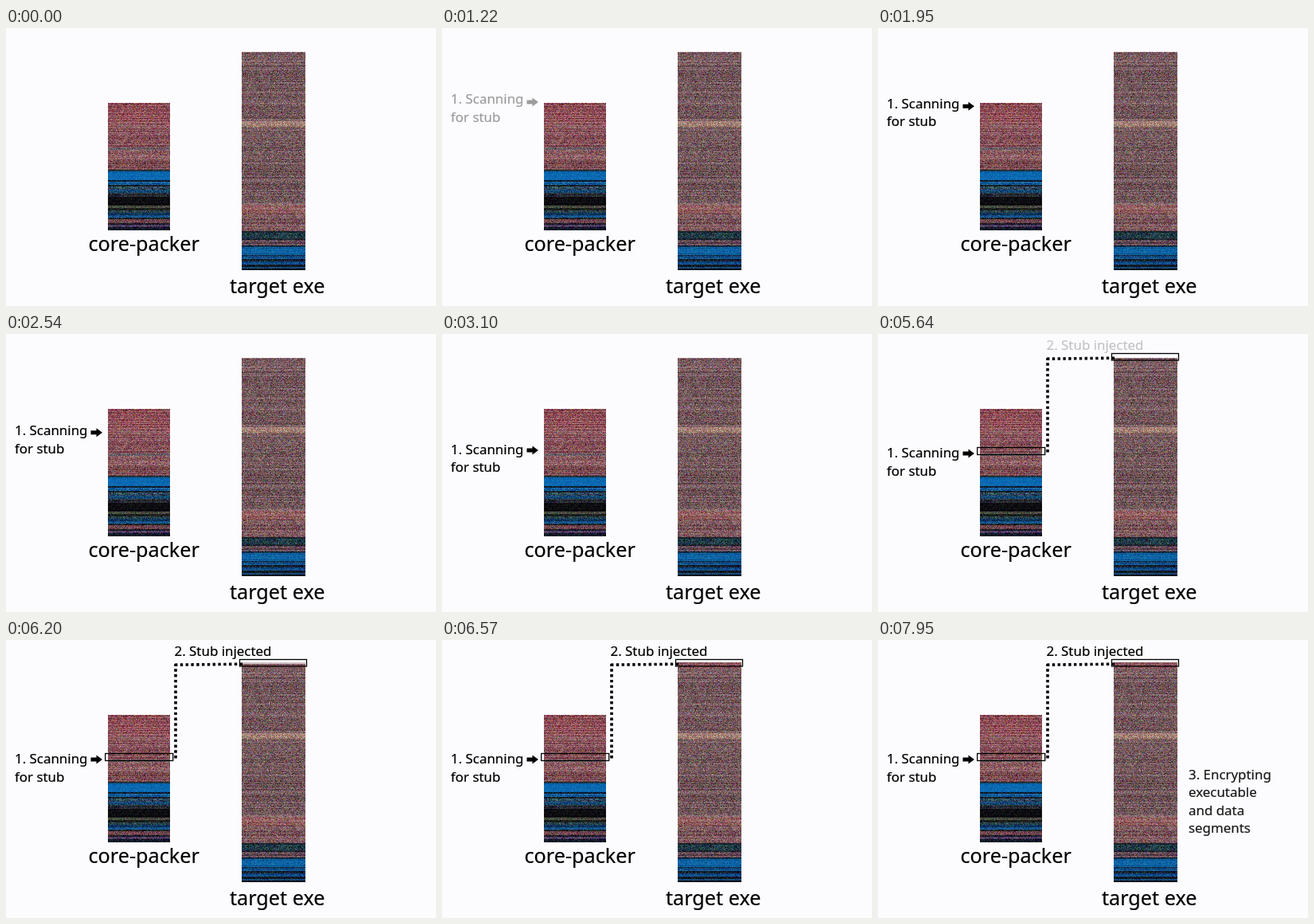
These frames come from a looping animation (540x349 px, 7.99 s). An HTML page with a canvas:

```html
<!DOCTYPE html>
<html lang="en">
<head>
<meta charset="utf-8">
<title>Packing an executable</title>
<style>
  html, body { margin: 0; width: 100%; height: 100%; overflow: hidden; background: #fcfcfe; }
  canvas, svg { position: absolute; left: 0; top: 0; width: 540px; height: 349px; }
  text { font: 16.9px "Noto Sans", "Open Sans", sans-serif; stroke: #000; stroke-width: 0.2; }
  .label { font-size: 25.2px; }
  .box { fill: none; stroke: #000; stroke-width: 1.3; }
  .dots { fill: none; stroke-width: 3.6; stroke-dasharray: 3.4; }
</style>
</head>
<body>
<canvas id="bytes" width="540" height="349"></canvas>
<canvas id="stub" width="540" height="349"></canvas>
<svg viewBox="0 0 540 349">
  <defs>
    <linearGradient id="up" gradientUnits="userSpaceOnUse" x1="0" x2="0">
      <stop offset="0"/><stop offset="1" stop-opacity="0"/>
    </linearGradient>
    <linearGradient id="across" gradientUnits="userSpaceOnUse" y1="0" y2="0">
      <stop offset="0"/><stop offset="1" stop-opacity="0"/>
    </linearGradient>
  </defs>
  <text class="label" x="103.5" y="280">core-packer</text>
  <text class="label" x="281" y="333">target exe</text>
  <g id="scan">
    <text x="11" y="155">1. Scanning</text>
    <text x="11" y="177.500">for stub</text>
  </g>
  <path id="arrow" d="M106.500 147.500h7v-3l7.500 5.500-7.500 5.500v-3h-7z"/>
  <rect id="found" class="box" x="124.700" y="142.500" width="85" height="9"/>
  <path class="dots" stroke="url(#up)" d="M213 148.500V30"/>
  <path class="dots" stroke="url(#across)" d="M212 31.200L297 30.200"/>
  <rect id="slot" class="box" x="293.500" y="24.500" width="84" height="8.500"/>
  <text id="inject" x="211.500" y="20">2. Stub injected</text>
  <g id="encrypt">
    <text x="390" y="175">3. Encrypting</text>
    <text x="390" y="197">executable</text>
    <text x="390" y="220">and data</text>
    <text x="390" y="242">segments</text>
  </g>
</svg>
<script>
const LOOP = 7990, START = 1030, STEP = 500;
const $ = id => document.getElementById(id);

let seed = 7;
const random = () => (seed = seed * 16807 % 2147483647) / 2147483647;
const spread = amount => (random() + random() - 1) * amount;

// Each band is [bottom edge, colour, noise].
function drawBytes(canvas, x, top, width, bands) {
  const ctx = canvas.getContext('2d');
  let y = top;
  for (const [bottom, colour, noise] of bands) {
    const rgb = [1, 3, 5].map(i => parseInt(colour.substr(i, 2), 16));
    for (; y < bottom; y++) {
      const streak = spread(noise * 0.4);
      for (let i = 0; i < width; i++) {
        const light = streak + spread(noise * 0.7);
        ctx.fillStyle = `rgb(${rgb.map(c => Math.round(c + light + spread(noise * 0.7)))})`;
        ctx.fillRect(x + i, y, 1, 1);
      }
    }
  }
}

drawBytes($('bytes'), 128, 94, 78, [
  [120, '#8c4e56', 65], [150, '#86525a', 65], [153, '#70646c', 60],
  [166, '#8a5c60', 70], [178, '#7c4c52', 65], [180, '#1c3040', 30],
  [191, '#0a68b0', 24], [193, '#102030', 40], [197, '#0c5894', 50],
  [199, '#141c24', 40], [203, '#284458', 70], [207, '#104870', 60],
  [212, '#282c34', 55], [223, '#0a0a0e', 24], [226, '#44463c', 55],
  [229, '#181c1c', 40], [232, '#28444c', 60], [235, '#103c60', 50],
  [238, '#0c5088', 45], [240, '#20242c', 50], [245, '#643c44', 65],
  [247, '#1c2028', 45], [250, '#4c3c60', 65], [254, '#101828', 40]
]);
drawBytes($('bytes'), 296, 30, 80, [
  [44, '#78595f', 66], [46, '#8a686c', 60], [117, '#73585c', 66],
  [125, '#98786e', 66], [222, '#71565a', 66], [233, '#92605e', 66],
  [255, '#78545a', 66], [257, '#14202a', 35], [264, '#2a4650', 65],
  [266, '#1c2830', 50], [273, '#644a54', 65], [275, '#102c44', 40],
  [285, '#0c62a2', 32], [287, '#103050', 45], [290, '#0c5490', 45],
  [293, '#101a26', 40], [297, '#0c4c88', 50], [300, '#0e1824', 40],
  [302, '#104470', 50], [304, '#080c14', 24]
]);
drawBytes($('stub'), 296, 28, 80, [[36, '#845058', 65]]);

const progress = (t, start, length = STEP) => Math.min(1, Math.max(0, (t - start) / length));
const ease = p => p < 0.5 ? 2 * p * p : 1 - 2 * (1 - p) ** 2;
const fade = (id, p) => $(id).style.opacity = p;
const drop = (id, distance, p) =>
  $(id).setAttribute('transform', `translate(0 ${distance * (p - 1)})`);

// Soft-edged wipe: the gradient runs from the solid part to the leading edge.
function wipe(id, axis, from, to, p) {
  const soft = (to - from) * 0.18;
  const front = from + (to - from + soft) * p;
  $(id).setAttribute(axis + 1, front - soft);
  $(id).setAttribute(axis + 2, front);
}

function draw(now) {
  const t = now % LOOP;
  const stage = n => progress(t, START + n * STEP);
  fade('scan', stage(0));
  fade('arrow', stage(0));
  const travel = ease(progress(t, START + STEP, 4 * STEP - 60));
  drop('scan', 60, travel);
  drop('arrow', 57, travel);
  fade('found', stage(5));
  wipe('up', 'y', 149, 29, stage(6));
  wipe('across', 'x', 211, 298, stage(7));
  fade('slot', stage(8));
  fade('inject', stage(9));
  fade('stub', stage(10));
  fade('encrypt', progress(t, 7500));
  requestAnimationFrame(draw);
}
draw(0);
</script>
</body>
</html>
```
